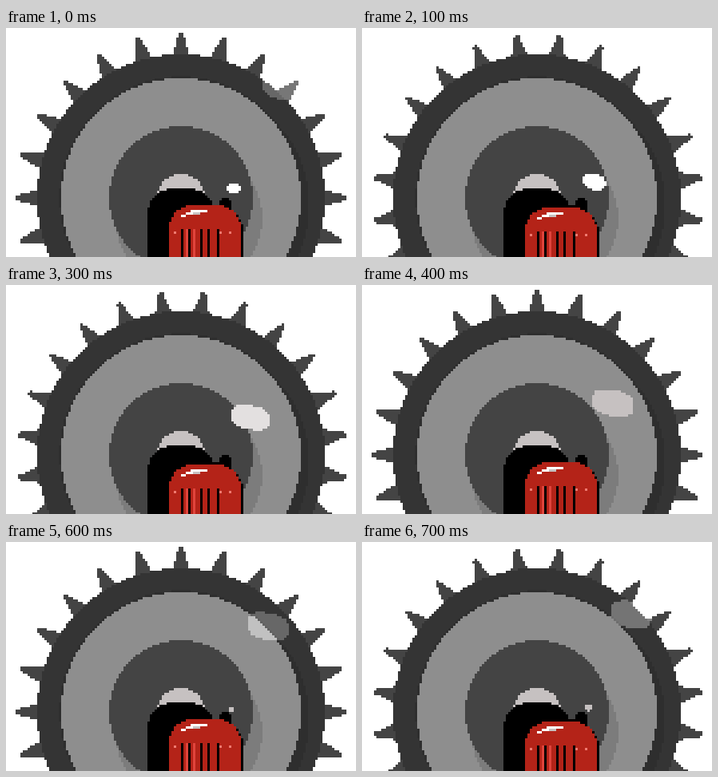
Write an HTML page with a canvas that moves like this. It is 438 by 287 pixels and loops after 0.8 s.

```html
<!DOCTYPE html>
<html>
<head>
<meta charset="utf-8">
<style>
html, body { margin: 0; width: 100%; height: 100%; overflow: hidden; background: #fff; }
canvas { display: block; width: 438px; height: 288px; image-rendering: pixelated; }
</style>
</head>
<body>
<canvas id="c" width="146" height="96"></canvas>
<script>
const W = 146, H = 96, CX = 73, CY = 71, TOOTH = Math.PI / 12;
const ctx = document.getElementById('c').getContext('2d');

// Fill every cell whose centre passes the test, so edges stay hard.
function fill(color, test) {
  ctx.fillStyle = color;
  for (let y = 0; y < H; y++)
    for (let x = 0; x < W; x++)
      if (test(x + .5, y + .5)) ctx.fillRect(x, y, 1, 1);
}
const disc = (color, cx, cy, r) => fill(color, (x, y) => Math.hypot(x - cx, y - cy) < r);
const rect = (color, x, y, w, h) => { ctx.fillStyle = color; ctx.fillRect(x, y, w, h); };

// Box with rounded top corners that runs off the bottom of the stage.
function box(color, x0, x1, top, r) {
  fill(color, (x, y) => {
    const dx = Math.max(x0 + r - x, x - x1 + r, 0);
    return y > top && Math.hypot(dx, Math.max(top + r - y, 0)) < r;
  });
}

// The half-turned pose also sits half a cell lower and to the right.
function blade(turn) {
  fill('#444', (x, y) => {
    const dx = x - CX - turn, dy = y - CY - turn, r = Math.hypot(dx, dy);
    if (r < 58 || r > 69.3) return false;
    const a = Math.atan2(dy, dx) / TOOTH - turn;
    return Math.abs(a - Math.round(a)) * TOOTH * r < .8 + (69 - r) * .3;
  });
  disc('#343434', CX, CY, 60);
  disc('#2e2e2e', CX, CY, 50.7);
  disc('#2e2e2e', 76.5, 74, 50);
  disc('#8e8e8e', CX, CY, 50);
  disc('#7c7c7c', 76.3, 79.5, 30.5);
  disc('#444', CX, CY, 30);
  disc('#c6c1c1', CX, CY, 10);
}

function motor(drop) {
  box('#000', 59, 87, 67, 11);
  box('#000', 80, 94, 74, 2);
  disc('#000', 91.5, 73.5, 2.6);
  const y = 74 + drop;
  box('#000', 69, 99, y + 1, 10);
  box('#b42318', 68, 98, y, 10);
  rect('#fff', 77, y + 2, 7, 1);
  rect('#fff', 75, y + 3, 3, 1);
  rect('#c6c1c1', 78, y + 3, 3, 1);
  rect('#fff', 73, y + 4, 2, 1);
  for (const x of [73, 76, 81, 84, 88]) rect('#000', x, y + 10, 1, H);
  for (const x of [75, 78]) rect('#e0443c', x, y + 10, 1, H);
  for (const x of [70, 89, 93]) rect('#ef7a70', x, y + 11, 1, 1);
}

// Puff by age: centre x, centre y, half width, half height in screen pixels.
const PUFF = [
  [282, 210, 3, 3], [283.5, 208, 5, 4], [285, 201, 9.5, 6.5], [291, 193, 15, 10],
  [297, 184, 21, 14], [306, 166, 24, 15], [314, 148, 26, 16.5], [322, 127, 26, 17],
  [328, 106, 26, 17], [337, 91, 25, 17], [343, 72, 23, 17]
];

function puff(age) {
  const [cx, cy, rx, ry] = PUFF[age].map(v => v / 3);
  const tilt = age < 3 ? 0 : .15;
  const n = age > 4 ? 2.6 : 2;
  const color = age < 2 ? '#c6c1c1' : age < 5 ? '#fff' : age < 6 ? '#e3e0e0'
    : age < 8 ? '#c6c1c1' : age === 9 ? '#404040' : '#333';
  // Old puffs thin out to a glow over whatever lies below.
  ctx.globalCompositeOperation = age < 8 ? 'source-over' : 'lighter';
  fill(color, (x, y) => {
    const dx = x - cx, dy = y - cy - dx * tilt;
    return Math.abs(dx / rx) ** n + Math.abs(dy / ry) ** n < 1;
  });
  ctx.globalCompositeOperation = 'source-over';
}

function draw(step) {
  const odd = step % 2;
  rect('#fff', 0, 0, W, H);
  blade(odd / 2);
  motor(odd);
  for (let age = (step + 2) % 8; age < PUFF.length; age += 8) puff(age);
}

let last = -1;
function tick() {
  const step = Math.floor(performance.now() / 100) % 8;
  if (step !== last) draw(last = step);
  requestAnimationFrame(tick);
}
tick();
</script>
</body>
</html>
```
